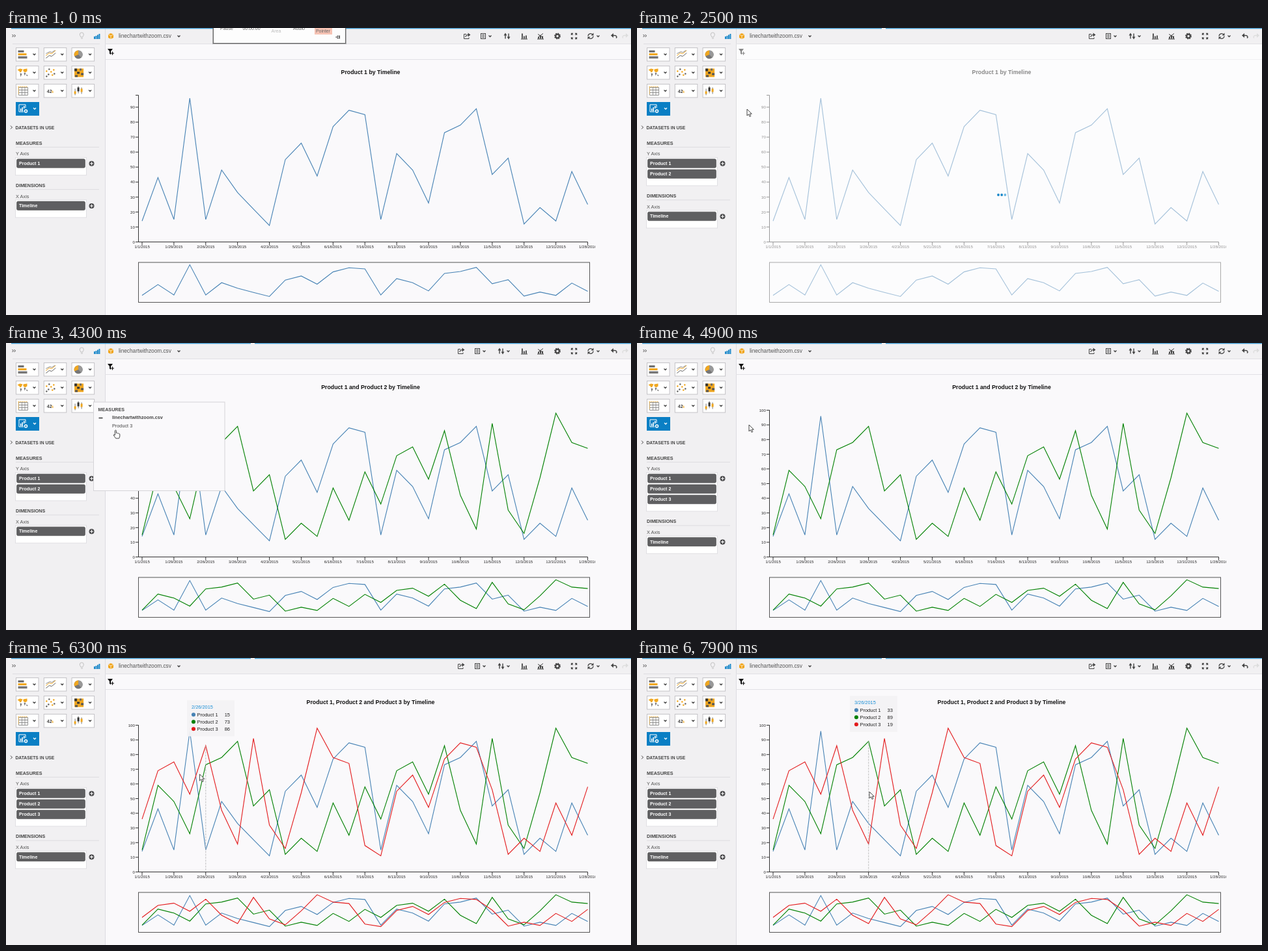
An HTML page that plays this animation: 960 px wide and 442 px high, repeating every 8 s.

```html
<!DOCTYPE html>
<html lang="en">
<head>
<meta charset="utf-8">
<title>Line chart builder</title>
<style>
  html, body { margin: 0; width: 100%; height: 100%; overflow: hidden; background: #faf9fb; }
  svg { display: block; width: 960px; height: 442px; font-family: "Liberation Sans", Arial, sans-serif; }
  text { white-space: pre; }
</style>
</head>
<body>
<svg id="stage" viewBox="0 0 960 442">
  <defs><clipPath id="labelClip"><rect x="198" y="95" width="707" height="250"/></clipPath></defs>
  <g id="base"></g>
  <g id="tools"></g>
  <g id="panel"></g>
  <g id="chart"></g>
  <g id="hover"></g>
  <g id="busy"></g>
  <g id="popup"></g>
  <g id="recorder"></g>
  <g id="cursor"></g>
</svg>
<script>
(() => {
const LOOP = 8000;
const $ = id => document.getElementById(id);
const COLORS = ['#4682b4', '#008000', '#e31a1c'];
const SERIES = [
  [14,43,15,96,15,48,33,22,11,55,66,44,77,88,85,15,59,48,26,73,78,89,45,56,12,23,14,47,25],
  [15,59,48,26,73,78,89,45,56,12,23,14,47,25,58,36,69,75,53,86,42,19,91,32,16,54,98,78,74],
  [36,69,75,53,86,42,19,91,32,16,54,98,78,74,18,11,55,66,44,77,88,85,56,12,23,14,47,25,58]
];
const TITLES = ['Product 1', 'Product 1 and Product 2', 'Product 1, Product 2 and Product 3'];

// Pointer path: time, x, y of the tip
const PATH = [
  [0, 470, -20], [200, 470, -20], [900, 75, 215], [1300, 57, 218], [1600, 57, 218],
  [2000, 172, 125], [2250, 170, 125], [2500, 169, 125], [2900, 169, 126], [3500, 110, 235],
  [3800, 110, 235], [4400, 173, 126], [4900, 172, 126], [5300, 172, 126], [5900, 255, 170],
  [6300, 297.5, 179], [6900, 322, 192], [7900, 357, 206], [8000, 357, 206]
];

// Markup helpers
const rect = (x, y, w, h, fill, more = '') =>
  `<rect x="${x}" y="${y}" width="${w}" height="${h}" fill="${fill}" ${more}/>`;
const line = (d, stroke, width = 1, more = '') =>
  `<path d="${d}" fill="none" stroke="${stroke}" stroke-width="${width}" ${more}/>`;
const shape = (d, fill) => `<path d="${d}" fill="${fill}"/>`;
const dot = (x, y, r, fill) => `<circle cx="${x}" cy="${y}" r="${r}" fill="${fill}"/>`;
const text = (x, y, size, str, fill = '#333', more = '') =>
  `<text x="${x}" y="${y}" font-size="${size}" fill="${fill}" ${more}>${str}</text>`;
const BOLD = 'font-weight="700" ';
const MID = 'text-anchor="middle" ';
const END = 'text-anchor="end" ';
const caret = (x, y, c = '#444') => line(`M${x - 2} ${y - 1}l2 2 2-2`, c, 1.3);
const at = (x, y, body) => `<g transform="translate(${x} ${y})">${body}</g>`;

// Chart scales
const STEP = 684.5 / 28;
const px = i => 209 + i * STEP;
const yMax = m => m === 1 ? 98 : 100;
const py = (v, m) => 329.5 - v * 226 / yMax(m);
const miniY = (v, m) => 419.8 - v * 56.3 / yMax(m);
const dateLabel = i => {
  const d = new Date(Date.UTC(2015, 0, 1 + 14 * i));
  return `${d.getUTCMonth() + 1}/${d.getUTCDate()}/${d.getUTCFullYear()}`;
};
const trace = (data, y) => 'M' + data.map((v, i) => `${px(i).toFixed(1)} ${y(v).toFixed(1)}`).join('L');

function tileIcons() {
  const o = '#f0a720', g = '#666';
  const dots = list => list.map(([x, y, c]) => dot(x, y, 1.3, c)).join('');
  return [
    rect(3, 4, 9, 3, g) + rect(3, 8.5, 13, 3, o) + rect(3, 13, 14, 3.5, '#777'),
    line('M3 16l5-4 4 1 6-5', g) + line('M3 12l5-4 4 1 6-5', o) + line('M3 9l6-3 3 1 5-3', '#888'),
    dot(10, 10.5, 6.5, '#777') + shape('M10 10.5V4a6.5 6.5 0 0 1 4.6 11.1z', '#999') + shape('M10 10.5V4a6.5 6.5 0 0 0-6 9z', o),
    shape('M2 6l4-2 4 1-2 4-2 1-1-2zM11 5l6-1v4l-3 2-3-2z', o) + shape('M6 11l3 1-2 5zM12 10l3 1-2 4zM15 13l3 1-1 2z', '#777'),
    dots([[4, 8, o], [8, 5, g], [11, 9, o], [15, 6, o], [7, 13, g], [13, 14, o], [16, 12, g], [4, 16, g]]),
    rect(4, 4, 14, 13, o) + rect(4, 4, 4, 4, '#333') + rect(12, 4, 3, 3, '#666') + rect(8, 9, 4, 3, '#333') + rect(14, 11, 4, 3, '#555') + rect(5, 14, 4, 3, '#555'),
    line('M4 5h14M4 9h14M4 13h14M4 17h14M4 5v12M9 5v12M13.5 5v12M18 5v12', '#888', .9) + line('M3 4h15M4 4v12', o, .8, 'stroke-dasharray="2 1"'),
    text(4.5, 13, 7, '42', '#444', BOLD) + text(12, 13, 5, 'k', o, BOLD),
    line('M5 7v10M10 3v11M15 5v10', '#555', .8) + rect(3.5, 11, 3, 4, o) + rect(8.5, 5, 3, 6, '#333') + rect(13.5, 7, 3, 5, o)
  ];
}

function drawBase() {
  let s = rect(0, 0, 960, 442, '#faf9fb') + rect(0, 0, 152, 442, '#f1f0f2') + rect(152, 0, 808, 24, '#f1f0f2');
  s += line('M152.5 1V442', '#dddce0') + line('M152 24.5H960M152 48.5H960', '#e2e1e5');
  s += rect(8, 0, 368, 1.3, '#3d9bd3') + rect(382, 0, 578, 1.3, '#3d9bd3');
  s += line('M9.5 10l2 2-2 2M12.5 10l2 2-2 2', '#444');
  s += line('M114.8 14c0-1.5-1.5-2-1.5-4a3 3 0 0 1 6 0c0 2-1.5 2.5-1.5 4zM115 16h3', '#bbb', .9);
  s += [4, 5, 6.5, 8].map((h, i) => rect(135 + i * 2.5, 17 - h, 1.9, h, '#1384c8')).join('');
  s += line('M10 24.5H144', '#dedde1');

  tileIcons().forEach((icon, i) => {
    const x = 15.5 + i % 3 * 42.8, y = 30.5 + Math.floor(i / 3) * 28;
    s += at(x, y, rect(0, 0, 34.5, 20.5, '#fff', 'stroke="#c4c3c7"') + icon + caret(28, 10));
  });
  s += rect(15, 114, 36, 21, '#0a7fc4');
  s += line('M20 118v11h7M20 118h10v5', '#fff') + rect(22, 124, 1.5, 4, '#fff') + rect(24.5, 122, 1.5, 6, '#fff') + rect(27, 120, 1.5, 4, '#fff');
  s += '<circle cx="30.5" cy="128" r="2" fill="none" stroke="#fff" stroke-width="1.5"/>' + caret(44, 124, '#fff');
  s += line('M7 150.5l2.5 2.5-2.5 2.5', '#444') + text(14.5, 155.7, 6.75, 'DATASETS IN USE', '#444', BOLD);

  s += shape('M161 8l4 2v5l-4 2-4-2v-5z', '#f0a51c') + line('M157 10l4 2 4-2M161 12v5', '#fff', .7);
  s += text(173, 15.3, 8.28, 'linechartwithzoom.csv', '#555') + caret(265.5, 12.5);
  s += shape('M156 32h8l-3 4v5l-2-1.5V36z', '#111') + line('M163.5 36.5v5M161 39h5', '#111', 1.2);
  $('base').innerHTML = s;
}

function drawTools(wide) {
  const c = '#444', shift = wide ? -9 : 0, y = 12.5;
  let s = at(708 + shift, y, line('M-1-3h-3.5v7h7.5v-2', c) + line('M-2 1.5c0-2.5 2-3.5 4-3.5', c, 1.2) + shape('M1.5-5l4 3-4 3z', c));
  s += at(733 + shift, y, rect(-3.5, -4, 7, 8, 'none', `stroke="${c}"`) + line('M-2-2h4M-2 0h4M-2 2h4', c, .9)) + caret(743.5 + shift, y);
  s += at(769.5 + shift, y, line('M-2.5 4v-6M2.5-4v6', c, 1.4) + shape('M-5-1l2.5-4 2.5 4zM0 1l2.5 4 2.5-4z', c));
  if (wide) s += caret(771.5, y);
  s += at(796, y, rect(-4, -4, 1.8, 8, c) + rect(-1, 0, 1.8, 4, c) + rect(2, -1, 1.8, 5, c) + line('M-5 4.5h10', c));
  s += at(821, y, rect(-4, 1, 2, 3, c) + rect(-1, -1, 2, 5, c) + rect(2, 0, 2, 4, c) + line('M-5 4.5h10M-4-3l8 5M4-4l-7 5', c));
  s += at(847, y, `<circle r="2.8" fill="none" stroke="${c}" stroke-width="2.2"/><circle r="4.3" fill="none" stroke="${c}" stroke-width="1.4" stroke-dasharray="1.7 1.677"/>`);
  s += at(872.5, y, line('M-1.5-1.5l-2-2M1.5-1.5l2-2M-1.5 1.5l-2 2M1.5 1.5l2 2', c) + line('M-4-1.5V-4h2.5M4-1.5V-4H1.5M-4 1.5V4h2.5M4 1.5V4H1.5', c, 1.3));
  s += at(898, y, line('M-4 0a4 4 0 0 1 7-2.5M4 0a4 4 0 0 1-7 2.5', c, 1.2) + shape('M4.5-5v4h-4zM-4.5 5v-4h4z', c)) + caret(909.5, y);
  s += at(934, y, line('M-3-1h4a3 2.3 0 0 1 2 4', c, 1.5) + shape('M-5-1l4-3.5v7z', c));
  s += at(951, y, line('M3-1h-4a3 2.3 0 0 0-2 4', '#ddd', 1.3) + shape('M5-1l-4-3.5v7z', '#ddd'));
  $('tools').innerHTML = s;
}

const pill = (y, name) => rect(16.5, y, 105, 13.5, '#5f5f61', 'rx="2" stroke="#4e4e50" stroke-width=".6"') + text(20, y + 9.2, 7, name, '#fff', BOLD);
const plus = y => dot(131.5, y, 4, '#4a4a4c') + line(`M129 ${y}h5M131.5 ${y - 2.5}v5`, '#fff', 1.1);

function shelf(y, label, axis, names, active) {
  const h = 11 + names.length * 16.2;
  return text(15, y, 7.15, label, '#444', BOLD) + line(`M15 ${y + 4}H143`, '#dddce0')
    + text(15, y + 16.8, 7.4, axis, '#555')
    + rect(14.5, y + 20, 109, h, '#fff', `stroke="${active ? '#2a8fd0' : '#e0dfe3'}"`)
    + names.map((n, i) => pill(y + 22.3 + i * 16.2, n)).join('') + plus(y + 29.3);
}

function drawPanel(n, active) {
  const names = [1, 2, 3].slice(0, n).map(i => 'Product ' + i);
  $('panel').innerHTML = shelf(179.5, 'MEASURES', 'Y Axis', names, active)
    + shelf(244.7 + (n - 1) * 16.2, 'DIMENSIONS', 'X Axis', ['Timeline'], false);
}

function drawChart(m) {
  let ticks = 'M199 103.5H203.5V329.5H199M203.5 329.5H893.5', values = '', dates = '';
  for (let v = 0; v <= yMax(m); v += 10) {
    const y = py(v, m);
    ticks += `M199 ${y}h4.5`;
    values += text(197.8, y + 2.2, 6.1, v, '#222', END);
  }
  for (let i = 0; i <= 28; i += 2) {
    ticks += `M${px(i)} 329.5v5`;
    dates += text(px(i), 339.3, 6.1, dateLabel(i), '#222', MID);
  }
  const traces = scale => SERIES.slice(0, m)
    .map((d, k) => line(trace(d, v => scale(v, m)), COLORS[k], 1.1)).join('');
  $('chart').innerHTML = text(560, 71.2, 8.75, TITLES[m - 1] + ' by Timeline', '#111', BOLD + MID)
    + line(ticks, '#333') + values + `<g clip-path="url(#labelClip)">${dates}</g>` + traces(py)
    + rect(203.5, 361, 693, 61.5, 'none', 'stroke="#555"') + traces(miniY);
}

function drawHover(i) {
  if (i < 0) { $('hover').innerHTML = ''; return; }
  const values = SERIES.map(d => d[i]);
  const peak = py(Math.max(...values), 3), x = px(i) - 28.8, y = peak - 70;
  let s = line(`M${px(i)} ${peak}V329`, '#bbb', .9, 'stroke-dasharray="3 1.5"');
  s += rect(x, y, 73, 55.5, '#f4f3f5', 'opacity=".96"') + text(x + 7, y + 13, 7.4, dateLabel(i), '#1a8fd6');
  values.forEach((v, k) => {
    const cy = y + 22 + k * 11;
    s += dot(x + 10, cy, 3, COLORS[k]) + text(x + 15.5, cy + 2.7, 7.5, 'Product ' + (k + 1), '#222') + text(x + 66, cy + 2.7, 7.5, v, '#222', END);
  });
  $('hover').innerHTML = s;
}

function drawPopup(n) {
  let s = rect(134.5, 91, 201.5, 136.5, '#faf9fb', 'stroke="#d5d4d8"');
  s += text(141.5, 104.5, 7.15, 'MEASURES', '#444', BOLD) + line('M142.5 115.5h6', '#333', 1.5);
  s += text(163, 116.8, 7.25, 'linechartwithzoom.csv', '#444', BOLD);
  for (let k = n + 1; k <= 3; k++) s += text(163, 129.7 + (k - n - 1) * 13.7, 7.3, 'Product ' + k, '#444');
  $('popup').innerHTML = s;
}

function drawRecorder() {
  const c = '#666';
  $('recorder').innerHTML = rect(317, -30, 206, 55, '#777', 'opacity=".5"') + rect(318.5, -30, 203, 53.5, '#fdfdfd', 'stroke="#666"')
    + rect(474, -14, 27, 24, '#f6c3b4')
    + [[339, 2.5, 'Pause'], [377, 2.5, '00:00:00'], [450, 2.5, 'Audio'], [487, 6.5, 'Pointer']].map(([x, y, w]) => text(x, y, 7, w, c, MID)).join('')
    + text(415, 6.5, 7, 'Area', '#bbb', MID) + line('M506 14h3M509 11.5v5M509 12.5h3v3h-3M512.5 11.5v5', '#555');
}

const ARROW = '<path d="M0 0v10l2.4-2.2 1.7 3.7 1.7-.8-1.7-3.5h3.2z" fill="#fff" stroke="#333" stroke-width=".9"/>';
const HAND = '<path d="M-1 1q1-1.5 2 0v4q1.5-1 2 .3 1.5-.6 2 .5 1.4-.2 1.4 1v3.2l-1.2 3h-5l-3.4-5q0-1.6 2.2 0z" fill="#fff" stroke="#333" stroke-width=".9"/>';

const ramp = (t, a, b) => Math.min(1, Math.max(0, (t - a) / (b - a)));
const within = (t, a, b) => t >= a && t < b;
const fade = (t, a, b, c, d) => ramp(t, a, b) * (1 - ramp(t, c, d));

function pointer(t) {
  const k = PATH.findIndex(p => p[0] > t);
  const [t0, x0, y0] = PATH[k - 1], [t1, x1, y1] = PATH[k];
  const u = ramp(t, t0, t1), e = u * u * (3 - 2 * u);
  return [x0 + (x1 - x0) * e, y0 + (y1 - y0) * e];
}

// Redraw a part only when its inputs change
const seen = {};
function update(key, draw, ...args) {
  const sig = args.join();
  if (seen[key] !== sig) { seen[key] = sig; draw(...args); }
}

function render(t) {
  const pills = t < 2200 ? 1 : t < 4700 ? 2 : 3;
  const drawn = t < 2800 ? 1 : t < 5350 ? 2 : 3;
  const [x, y] = pointer(t);
  const hand = within(t, 850, 2200) || within(t, 3400, 4700);

  update('tools', drawTools, pills > 1);
  update('panel', drawPanel, pills, within(t, 1100, 1400) || within(t, 3450, 3900));
  update('chart', drawChart, drawn);
  update('hover', drawHover, t >= 5400 && x > 203 ? Math.round((x - 209) / STEP) : -1);

  const busy = t < 3500 ? fade(t, 2250, 2400, 2780, 2800) : fade(t, 4950, 5080, 5330, 5350);
  const lit = Math.floor(t / 150 + 1) % 3;
  $('busy').innerHTML = busy ? `<g opacity="${busy}">` + rect(153, 25, 807, 417, '#fff', 'opacity=".5"')
    + [0, 1, 2].map(i => dot(555 + i * 5.2, 257, 1.9, i === lit ? '#6bb8e2' : '#1787c9')).join('') + '</g>' : '';

  update('popup', drawPopup, t < 3000 ? 1 : 2);
  $('popup').setAttribute('opacity', t < 3000 ? fade(t, 1380, 1640, 2150, 2250) : fade(t, 3900, 4150, 4650, 4750));
  $('recorder').setAttribute('transform', `translate(0 ${-28 * ramp(t, 50, 300)})`);
  $('cursor').setAttribute('transform', `translate(${x.toFixed(1)} ${y.toFixed(1)})`);
  update('cursor', h => $('cursor').innerHTML = h ? HAND : ARROW, hand);
}

drawBase();
drawRecorder();
const start = performance.now();
function frame() {
  render((performance.now() - start) % LOOP);
  requestAnimationFrame(frame);
}
render(0);
requestAnimationFrame(frame);
})();
</script>
</body>
</html>
```
